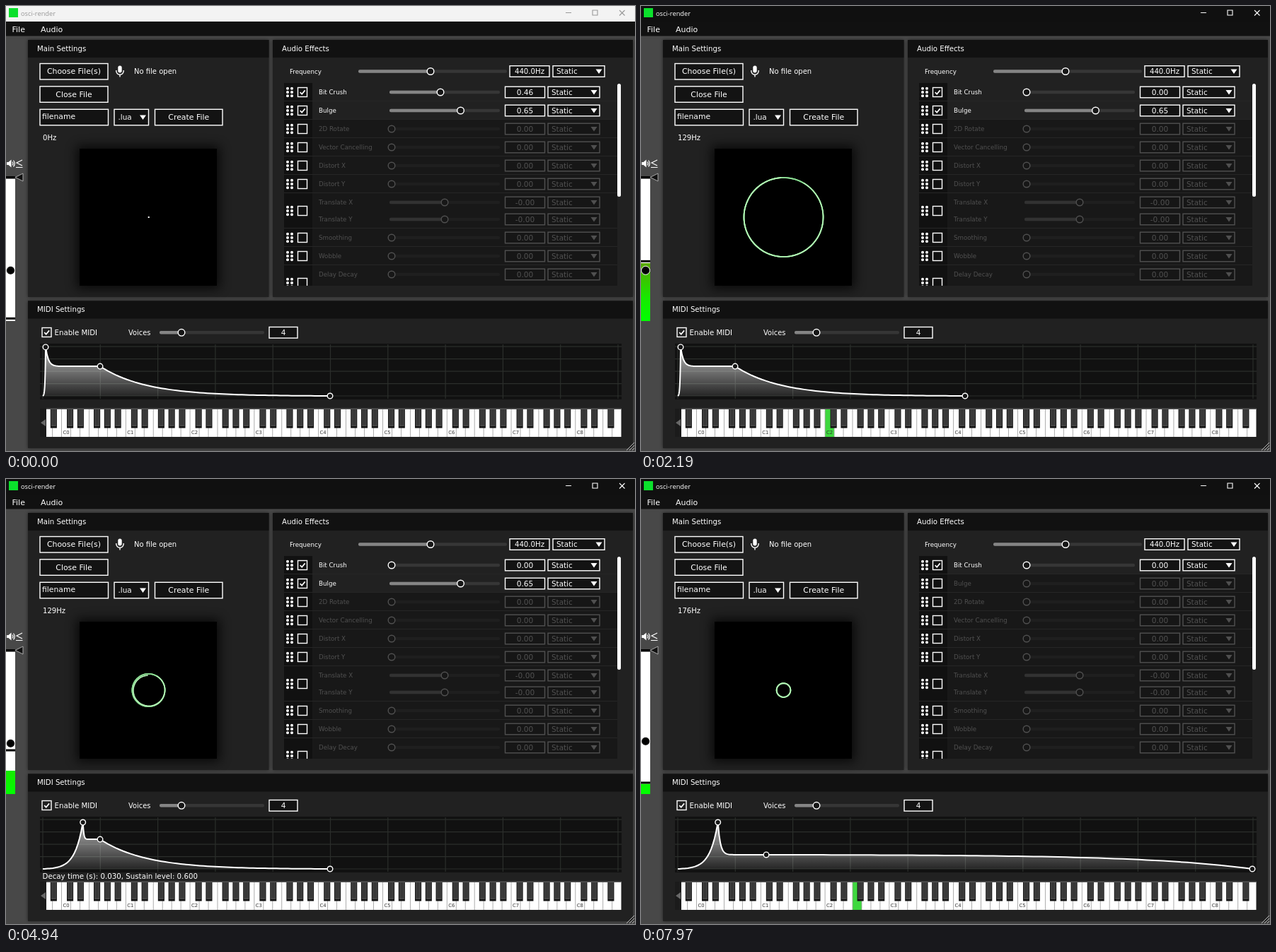
Recreate the animation shown at these times as an HTML page. Size 889 by 630 pixels, loop 7990 ms.

```html
<!DOCTYPE html>
<html lang="en">
<head>
<meta charset="utf-8">
<title>osci-render</title>
<style>
html, body { margin: 0; width: 100%; height: 100%; overflow: hidden; background: #444; }
svg { display: block; width: 889px; height: 630px; --bar: #f3f3f3; --ink: #999; }
svg.dark { --bar: #101010; --ink: #fff; }
text { font-family: "DejaVu Sans", sans-serif; fill: #fff; }
.win { font-family: "Open Sans", sans-serif; fill: var(--ink); }
.box { fill: #131313; stroke: #fff; stroke-width: 1.4; }
.knob { fill: #161616; stroke: #fff; stroke-width: 1.4; }
.line { fill: none; stroke: #fff; stroke-width: 1.4; }
</style>
</head>
<body>
<svg id="app" viewBox="0 0 889 630"></svg>
<script>
const LOOP = 7990;
const app = document.getElementById('app');

// Markup helpers
const rect = (x, y, w, h, fill, more = '') =>
  `<rect x="${x}" y="${y}" width="${w}" height="${h}" fill="${fill}" ${more}/>`;
const box = (x, y, w, h) => `<rect class="box" x="${x}" y="${y}" width="${w}" height="${h}"/>`;
const label = (s, x, mid, size, more = '') =>
  `<text x="${x}" y="${mid + size * 0.36}" font-size="${size}" ${more}>${s}</text>`;
const center = 'text-anchor="middle"';
const path = (d, more) => `<path d="${d}" ${more}/>`;
const knob = (x, y, r, more = '') => `<circle class="knob" cx="${x}" cy="${y}" r="${r}" ${more}/>`;
const range = n => [...Array(n).keys()];

const button = (s, x, y, w) => box(x, y, w, 22.5) + label(s, x + w / 2, y + 11, 10.9, center);
const arrow = (x, y) => path(`M${x - 4.5} ${y - 3}h9l-4.5 6.5z`, 'fill="#fff"');
const check = (x, y, on, id = '') =>
  `<rect class="line" x="${x}" y="${y - 6.5}" width="13" height="13"/>` +
  path(`M${x + 3.2} ${y + .2}l2.5 2.6l4.4 -5.4`, `class="line" style="stroke-width:1.7" ${id} visibility="${on ? 'visible' : 'hidden'}"`);
const panel = (title, x, y, w, h) =>
  rect(x, y, w, h, '#0008', 'filter="url(#soft)"') + rect(x, y, w, h, '#212121') +
  rect(x, y, w, 25, '#111') + label(title, x + 13, y + 12.2, 10.2);
const slider = (x0, x1, x, y, id = '') =>
  rect(x0, y - 2.3, x1 - x0, 4.6, '#363636', 'rx="2"') +
  rect(x0, y - 2.3, x - x0, 4.6, '#858585', `rx="2" ${id && `id="${id}Fill"`}`) +
  knob(x, y, 4.8, id && `id="${id}Knob"`);
const drop = (x, y) => box(x, y - 7.8, 73, 15.6) + label('Static', x + 5, y, 10.4) + arrow(x + 65, y);

// Effect list
const knobX = v => 545 + 150 * v;
function control(name, y, v, text, on, id = '') {
  return `<g ${id && `id="${id}"`} opacity="${on ? 1 : 0.24}">` + label(name, 442, y, 8.7) +
    slider(542, 698, knobX(v), y, id) + box(705.5, y - 7.8, 56, 15.6) +
    label(text, 733.5, y, 10.6, center + (id && ` id="${id}Text"`)) + drop(766, y) + '</g>';
}
function effect(top, h, controls, mid, on, id = '') {
  const dots = range(6).map(i =>
    `<circle cx="${398 + 6 * (i % 2)}" cy="${mid - 5.3 + 5.3 * (i >> 1)}" r="2" fill="#fff"/>`).join('');
  return rect(393, top, 471, h, on ? '#212121' : '#181818', id && `id="${id}Row"`) +
    rect(393, top, 40, h, '#111') + rect(393, top + h - 1, 471, 1, '#262626') +
    dots + check(412.5, mid, on, id && `id="${id}Check"`) + controls;
}
const single = (name, y, v, on, id) =>
  effect(y - 13, 26, control(name, y, v, v.toFixed(2), on, id), y, on, id);
const effects = single('Bit Crush', 122, .46, true, 'crush') + single('Bulge', 148, .65, true, 'bulge') +
  ['2D Rotate', 'Vector Cancelling', 'Distort X', 'Distort Y'].map((n, i) => single(n, 174 + 26 * i, 0, false)).join('') +
  effect(265, 50, control('Translate X', 278, .5, '-0.00', false) + control('Translate Y', 302, .5, '-0.00', false), 290, false) +
  single('Smoothing', 328, 0, false) + single('Wobble', 354, 0, false) +
  effect(367, 50, control('Delay Decay', 380, 0, '0.00', false), 392, false);

// Piano keyboard
const KEY_W = 12.97, C0 = 78.5;
const blackAt = [.58, 1.72, 3.51, 4.65, 5.79];
function keyboard() {
  let s = rect(57, 570, 812.5, 40, '#fff');
  s += rect(0, 570, KEY_W, 40, '#3fd83f', 'id="held"');
  for (let i = -1; i < 61; i++) s += rect(C0 + i * KEY_W - .4, 570, .8, 40, '#999');
  const black = x => rect(x, 570, 9.1, 27.5, '#111') + rect(x + 1, 570, 7.1, 25, '#444') + rect(x + 2, 570, 5, 23, '#383838');
  s += black(C0 - 1.21 * KEY_W);
  for (let o = 0; o < 9; o++) {
    const x = C0 + o * 7 * KEY_W;
    blackAt.forEach((b, i) => { if (o < 8 || i < 3) s += black(x + b * KEY_W); });
    s += label('C' + o, x + KEY_W / 2, 604, 6.8, center + ' style="fill:#333"');
  }
  return s + rect(57, 569.5, 812.5, 1.5, '#555') + rect(48, 570, 9, 40, '#1b1b1b') +
    path('M49 590l7 -5v10z', 'fill="#666"');
}

// Envelope geometry
const X0 = 52, SEC = 812, Y0 = 552, YH = 69.8;
const levelY = v => Y0 - YH * v;
const grid = range(11).map(i => `M${X0 + 81.3 * i} 479V556`).join('') +
  range(5).map(i => `M48 ${levelY(i / 4)}H870`).join('');

app.innerHTML = `<defs>
  <filter id="soft" x="-20%" y="-20%" width="140%" height="140%"><feGaussianBlur stdDeviation="2.5"/></filter>
  <filter id="shade" x="-30%" y="-30%" width="160%" height="160%"><feGaussianBlur stdDeviation="8"/></filter>
  <linearGradient id="level" gradientUnits="userSpaceOnUse" x1="0" y1="242" x2="0" y2="446">
    <stop stop-color="#f00"/><stop offset=".84" stop-color="#16ea00"/><stop offset="1" stop-color="#0f0"/></linearGradient>
  <linearGradient id="fade" gradientUnits="userSpaceOnUse" x1="0" y1="482" x2="0" y2="553">
    <stop stop-color="#fff" stop-opacity=".72"/><stop offset="1" stop-color="#fff" stop-opacity=".08"/></linearGradient>
  <clipPath id="list"><rect x="393" y="109" width="471" height="287"/></clipPath>
  <clipPath id="screen"><rect x="104" y="202" width="194" height="194"/></clipPath>
  </defs>` +
  rect(0, 0, 889, 630, '#484848') +
  rect(0, 0, 889, 22, 'var(--bar)') + rect(4, 3, 13, 13, '#0be02c') +
  `<text class="win" x="21" y="13.6" font-size="9.3">osci-render</text>` +
  path('M791 9.5h8M829 6h7v7h-7zM867 6l7.5 7.5M874.5 6l-7.5 7.5', 'fill="none" stroke="var(--ink)" stroke-width="1.1"') +
  rect(0, 22, 889, 20.5, '#111') + label('File', 8.5, 33, 11) + label('Audio', 49, 33, 11) +
  panel('Main Settings', 31, 48, 340.5, 364) + panel('Audio Effects', 377, 48, 509, 364) +
  panel('MIDI Settings', 31, 417.5, 855, 208.5) +

  button('Choose File(s)', 48, 81.5, 96) + button('Close File', 48, 113.8, 96) +
  button('Create File', 210.5, 146.3, 95.5) + box(48, 146.3, 96.5, 22.5) + label('filename', 51, 156.5, 10.8) +
  box(153, 146.3, 48.5, 22.5) + label('.lua', 158.5, 157.5, 10.4) + arrow(193.5, 157.5) +
  rect(158.3, 84.5, 5.4, 10, '#fff', 'rx="2.7"') +
  path('M155.8 91v1a5.2 5.2 0 0 0 10.4 0v-1M161 97v3.5', 'class="line"') +
  label('No file open', 181, 92.7, 10) + label('', 52, 186, 10.1, 'id="hz"') +
  rect(100, 198, 202, 202, '#000', 'opacity=".75" filter="url(#shade)"') + rect(104, 202, 194, 194, '#000') +
  `<g id="scope" clip-path="url(#screen)" fill="none" stroke-linecap="round" stroke-linejoin="round"></g>` +

  label('Frequency', 401, 92.5, 8.7) + slider(498, 708, 600, 92.5) + box(712, 84.7, 56, 15.6) +
  label('440.0Hz', 740, 92.5, 10.2, center) + drop(773, 92.5) +
  `<g clip-path="url(#list)">${effects}</g>` + rect(864, 110, 5, 160, '#fff', 'rx="2.5"') +

  check(51, 462, true) + label('Enable MIDI', 68.5, 462.3, 10.2) + label('Voices', 173, 462.3, 9.9) +
  slider(217, 365, 248, 462.3) + box(372, 454.5, 40, 15.6) + label('4', 392, 462.3, 10.5, center) +
  rect(48, 478, 822, 79, '#111') + path(grid, 'stroke="#2b2e2b" stroke-width="1.2"') +
  path('', 'id="area" fill="url(#fade)"') + path('', 'id="curve" class="line" style="stroke-width:2"') +
  range(3).map(i => knob(0, 0, 3.8, `id="dot${i}"`)).join('') +
  label('', 51.5, 562.8, 10.25, 'id="hint"') + keyboard() +

  rect(0, 244, 13, 202, '#fff') + rect(0, 0, 13, 0, 'url(#level)', 'id="meter"') + rect(0, 0, 13, 3, '#000', 'id="mark"') +
  rect(0, 241, 13, 3.5, '#000') + path('M13 242.5l11 -5.5v11z', 'fill="#111" stroke="#aaa"') +
  `<circle id="gain" cx="6.5" r="6" fill="#000" stroke="#fff"/>` +
  path('M1 221h2.5l4 -3.5v11l-4 -3.5h-2.5z', 'fill="#fff"') +
  path('M9 220.5q2 2.5 0 5M10.5 218.5q3.5 4.5 0 9M23 218l-8 4l8 4M14 228.5h9.5', 'class="line" style="stroke-width:1.2"') +
  path('M877 629l11 -11M881 629l7 -7M885 629l3 -3', 'stroke="#bbb" stroke-width="1"');

const el = id => document.getElementById(id);
const set = (id, attrs) => { for (const k in attrs) el(id).setAttribute(k, attrs[k]); };
const say = (id, s) => { if (el(id).textContent !== s) el(id).textContent = s; };

// Linear track: time, value, time, value, ...
function track(t, k) {
  if (t <= k[0]) return k[1];
  for (let i = 2; i < k.length; i += 2)
    if (t < k[i]) return k[i - 1] + (k[i + 1] - k[i - 1]) * (t - k[i - 2]) / (k[i] - k[i - 2]);
  return k[k.length - 1];
}
const bend = (x, c) => Math.abs(c) < .01 ? x : (Math.exp(c * x) - 1) / (Math.exp(c) - 1);

// Handles of the envelope at a given time
function envelope(t) {
  return {
    ax: track(t, [2520, 56, 2800, 60, 3280, 71.5, 3900, 100, 4300, 108.7]),
    al: track(t, [2520, .99, 3280, .953, 4300, .945]),
    dx: track(t, [5000, 133, 5550, 177]),
    sl: track(t, [5000, .6, 5550, .287]),
    rx: track(t, [5720, 458, 6450, 756, 6610, 844.3, 6720, 864]),
    rc: track(t, [6880, -5, 7220, 4.5])
  };
}

// start, release, white key, pitch, strength
const notes = [
  [20, 390, 21, 261, 100], [390, 740, 22, 293, 105], [740, 1080, 23, 329, 105], [1080, 1540, 24, 349, 104],
  [2010, 2440, 14, 129, 109], [2620, 3000, 14, 129, 85], [3228, 3560, 14, 129, 70], [4080, 4400, 14, 129, 60],
  [4790, 4935, 14, 129, 45], [5120, 5480, 14, 129, 45], [7290, 9000, 17, 176, 50]
];
function heldLevel(ms, e) {
  const s = ms / 1000, a = (e.ax - X0) / SEC, d = (e.dx - e.ax) / SEC;
  if (s < a) return e.al * bend(s / a, 5);
  return e.al + (e.sl - e.al) * bend(Math.min(1, (s - a) / d), -20);
}
function radius(t, e) {
  let r = 0;
  for (const [on, off, , , power] of notes) {
    if (t < on) continue;
    let v = heldLevel(Math.min(t, off) - on, e);
    if (t > off) v *= 1 - bend(Math.min(1, (t - off) / 1000 / ((e.rx - e.dx) / SEC)), e.rc);
    r = Math.max(r, power * Math.max(0, v) ** 1.3);
  }
  return Math.min(r, 92);
}
function pitch(t, e) {
  let hz = 0;
  for (const n of notes) if (t >= n[0] && t < n[1] + (e.rx - e.dx) / SEC * 1000) hz = n[3];
  return hz;
}

const CX = 201.5, CY = 299;
const at = (r, a) => (CX + r * Math.cos(a)).toFixed(1) + ' ' + (CY + r * Math.sin(a)).toFixed(1);
const stroke = (d, color, w) => path(d, `stroke="${color}" stroke-width="${w}"`);
const trail = ['#43a04c', '#6cc274', '#8fdc96', '#b4f4b6'];

function drawScope(t, e, hz, crush) {
  const r = radius(t, e);
  if (!hz || r < .6) return rect(200.7, 298, 2, 2, '#fff');
  if (crush > .01) {
    let d = '', ring = '';
    const n = 78, spread = .25 * crush / .46;
    for (let k = 0; k < 5; k++) {
      const rr = r * (1 + spread * (k / 4 - .54));
      ring += `M${CX - rr} ${CY}a${rr} ${rr} 0 1 1 0 .01`;
      for (let i = 0; i < n; i++) {
        const a = i / n * 2 * Math.PI;
        d += `M${at(rr, a + .035 * Math.sin(4 * a) * (k - 2))}h0`;
      }
    }
    return stroke(ring, '#0a3d10', .8) + stroke(d, '#a5eea5', 1.9);
  }
  // Last 28 ms of the signal, oldest part first
  const span = 28, parts = trail.length, steps = 40;
  return trail.map((color, p) => {
    let d = '';
    for (let i = 0; i <= steps; i++) {
      const ago = span * (1 - (p + i / steps) / parts);
      d += (i ? 'L' : 'M') + at(radius(t - ago, e), .8 + (span - ago) / 1000 * hz * 2 * Math.PI);
    }
    return stroke(d, color, 1.7);
  }).join('');
}

function drawEnvelope(e) {
  let d = '';
  const seg = (xa, ya, xb, yb, c, n) => {
    for (let i = 0; i <= n; i++)
      d += `${d ? 'L' : 'M'}${(xa + (xb - xa) * i / n).toFixed(2)} ${levelY(ya + (yb - ya) * bend(i / n, c)).toFixed(2)}`;
  };
  seg(X0, 0, e.ax, e.al, 5, 24);
  seg(e.ax, e.al, e.dx, e.sl, -20, 40);
  seg(e.dx, e.sl, e.rx, 0, e.rc, 60);
  set('curve', { d });
  set('area', { d: d + `L${X0} ${Y0}Z` });
  [[e.ax, e.al], [e.dx, e.sl], [e.rx, 0]].forEach(([x, v], i) => set('dot' + i, { cx: x, cy: levelY(v) }));
}

function hint(t, e) {
  const sec = px => (px / SEC).toFixed(3);
  if (t < 2500 || t > 6850) return '';
  if (t < 4780) return `Attack time (s): ${sec(e.ax - X0)}, Attack level: ${e.al.toFixed(3)}`;
  if (t < 5660) return `Decay time (s): ${sec(e.dx - e.ax)}, Sustain level: ${e.sl.toFixed(3)}`;
  return `Release time (s): ${sec(e.rx - e.dx)}`;
}

function setEffect(id, v, on) {
  set(id + 'Knob', { cx: knobX(v) });
  set(id + 'Fill', { width: v ? knobX(v) - 542 : 0 });
  say(id + 'Text', v.toFixed(2));
  set(id, { opacity: on ? 1 : .24 });
  set(id + 'Row', { fill: on ? '#212121' : '#181818' });
  set(id + 'Check', { visibility: on ? 'visible' : 'hidden' });
}

function render(t) {
  const e = envelope(t), hz = pitch(t, e);
  const crush = track(t, [1680, .46, 1920, 0]), bulge = t < 7400;
  app.classList.toggle('dark', t >= 1650);
  setEffect('crush', crush, true);
  setEffect('bulge', bulge ? .65 : 0, bulge);

  say('hz', (t < 20 ? 0 : pitch(t - 70, e)) + 'Hz');
  el('scope').innerHTML = drawScope(t, e, hz, crush);
  drawEnvelope(e);
  say('hint', hint(t, e));

  const key = notes.find(n => t >= n[0] && t < n[1]);
  set('held', { visibility: key ? 'visible' : 'hidden', x: key ? C0 + key[2] * KEY_W : 0 });

  // Meter follows a short average, the mark falls slowly
  const h = Math.min(82, range(5).reduce((s, i) => s + radius(t - 5 * i, e), 0) / 5 * 1.46);
  const peak = track(t, [0, 1, 30, 80, 1600, 80, 2000, 52, 2030, 85, 2500, 84, 3220, 62, 3280, 66,
    4060, 30, 4160, 80, 4780, 34, 4880, 64, 4940, 62, 5640, 30, 6610, 14, 7280, 6, 7370, 60, 7970, 16]);
  set('meter', { y: 446 - h, height: h });
  set('mark', { y: 444.5 - Math.max(h, peak) });
  set('gain', { cy: track(t, [7650, 374.3, 7800, 371.3]) });
}

const begin = performance.now();
function tick() {
  render((performance.now() - begin) % LOOP);
  requestAnimationFrame(tick);
}
tick();
</script>
</body>
</html>
```
